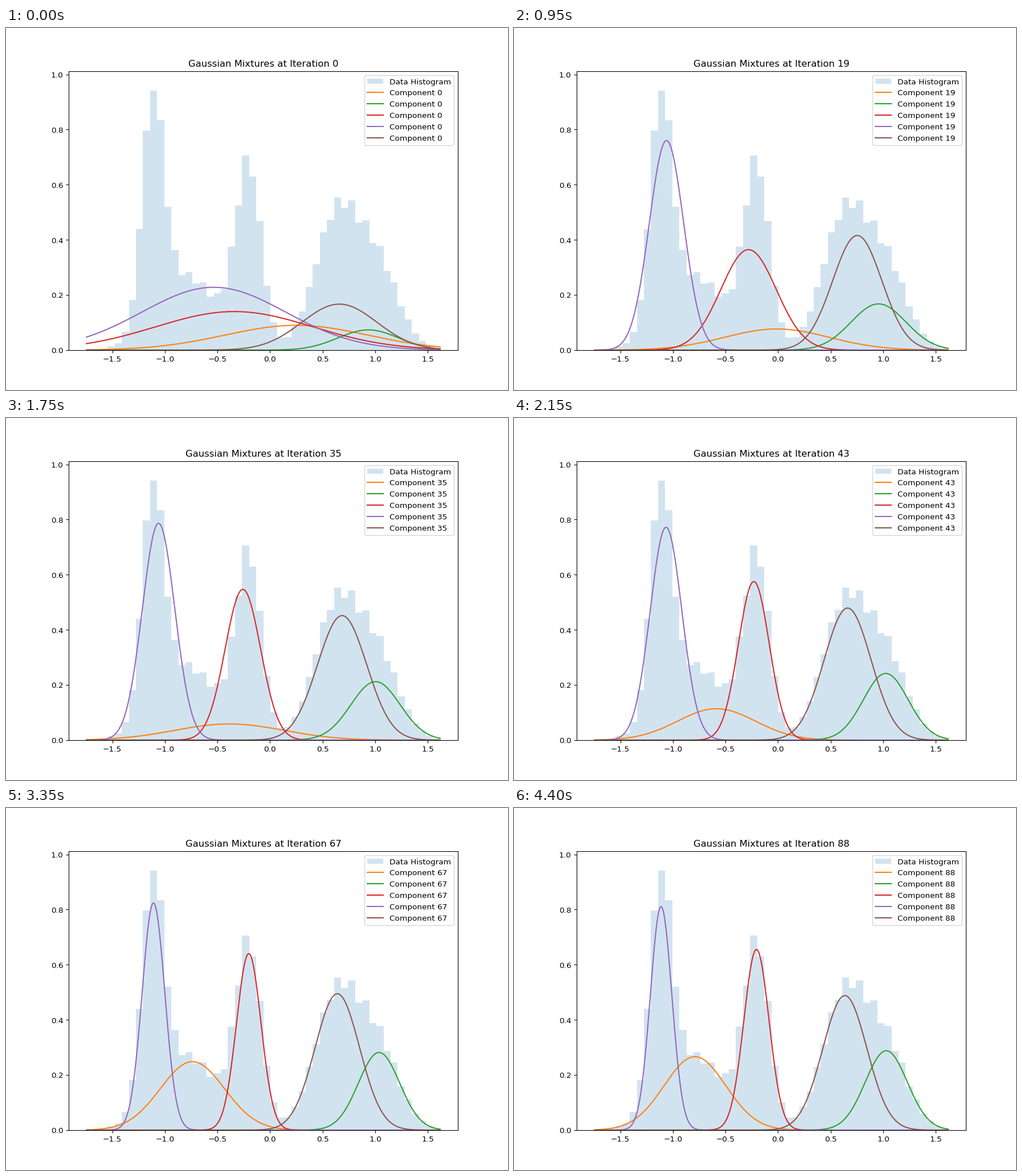
Recreate the animation shown at these times as a matplotlib script. Size 881 by 636 pixels, loop 4950 ms.

```python
import numpy as np
import matplotlib.pyplot as plt
from matplotlib.animation import FuncAnimation

FRAMES, INTERVAL, LAST = 99, 50, 88
X0, X1, BINS, TOP = -1.746, 1.618, 50, 1.0113

# Key fits by iteration: means, deviations and peak heights per component.
# EM fills in everything between them.
FITS = {
    0: ((.25, .935, -.34, -.535, .66),
        (.68, .288, .746, .683, .357),
        (.090, .0735, .140, .228, .167)),
    12: ((.10, .935, -.385, -.875, .765),
         (.575, .256, .475, .357, .239),
         (.069, .160, .172, .414, .392)),
    43: ((-.585, 1.025, -.23, -1.065, .662),
         (.37, .213, .147, .151, .224),
         (.114, .242, .575, .772, .479)),
    LAST: ((-.79, 1.03, -.205, -1.112, .636),
           (.293, .200, .120, .102, .210),
           (.2665, .288, .6555, .811, .488)),
}
FITS = {k: np.array(v) for k, v in FITS.items()}


def curves(x, fit):
    mu, sigma, peak = fit[:, :, None]
    return peak * np.exp(-((x - mu) / sigma) ** 2 / 2)


def em_step(fit, x, mass):
    """One expectation-maximisation update against the data density."""
    dens = curves(x, fit)
    resp = mass * dens / (dens.sum(axis=0) + 1e-300)
    weight = resp.sum(axis=1)
    mu = resp @ x / weight
    sigma = np.sqrt((resp * (x - mu[:, None]) ** 2).sum(axis=1) / weight)
    return np.array([mu, sigma, weight / (sigma * np.sqrt(2 * np.pi))])


def fit_path():
    """EM runs between key fits, each eased to land on the next one."""
    x = np.linspace(X0, X1, 300)
    mass = curves(x, FITS[LAST]).sum(axis=0)
    mass /= mass.sum()
    path = []
    for a, b in zip(list(FITS), list(FITS)[1:]):
        run = [FITS[a]]
        for _ in range(b - a):
            run.append(em_step(run[-1], x, mass))
        shift = FITS[b][0] - run[-1][0]
        scale = FITS[b][1:] / run[-1][1:]
        for t, fit in zip(np.linspace(0, 1, b - a + 1)[:-1], run):
            path.append(np.vstack([[fit[0] + t * shift],
                                   fit[1:] * scale ** t]))
    return path + [FITS[LAST]]


path = fit_path()
x = np.linspace(X0, X1, 500)

# The data follow the last mixture, with some sampling roughness
edges = np.linspace(X0, X1, BINS + 1)
centers = (edges[:-1] + edges[1:]) / 2
density = curves(centers, FITS[LAST]).sum(axis=0)
density += .04 * density ** .75 * np.cos(3 * np.arange(BINS) + 2.4)

plt.rcParams["font.family"] = "DejaVu Sans"
fig, ax = plt.subplots(figsize=(9, 6.5), dpi=881 / 9)  # 881 x 636 px
ax.hist(centers, bins=edges, weights=density, histtype="stepfilled",
        color="C0", alpha=.2, label="Data Histogram")
lines = [ax.plot(x, 0 * x, color=f"C{n}", label="Component 0")[0]
         for n in range(1, 6)]
margin = .05 * (X1 - X0)
ax.set_xlim(X0 - margin, X1 + margin)
ax.set_ylim(0, TOP)
title = ax.set_title("Gaussian Mixtures at Iteration 0")
labels = ax.legend(loc="upper right").get_texts()[1:]


def update(frame):
    step = min(frame, LAST)
    for line, y, label in zip(lines, curves(x, path[step]), labels):
        line.set_ydata(y)
        label.set_text(f"Component {step}")
    title.set_text(f"Gaussian Mixtures at Iteration {step}")
    return [*lines, *labels, title]


anim = FuncAnimation(fig, update, frames=FRAMES, interval=INTERVAL,
                     repeat=True, repeat_delay=0, blit=False)
plt.show()
```
